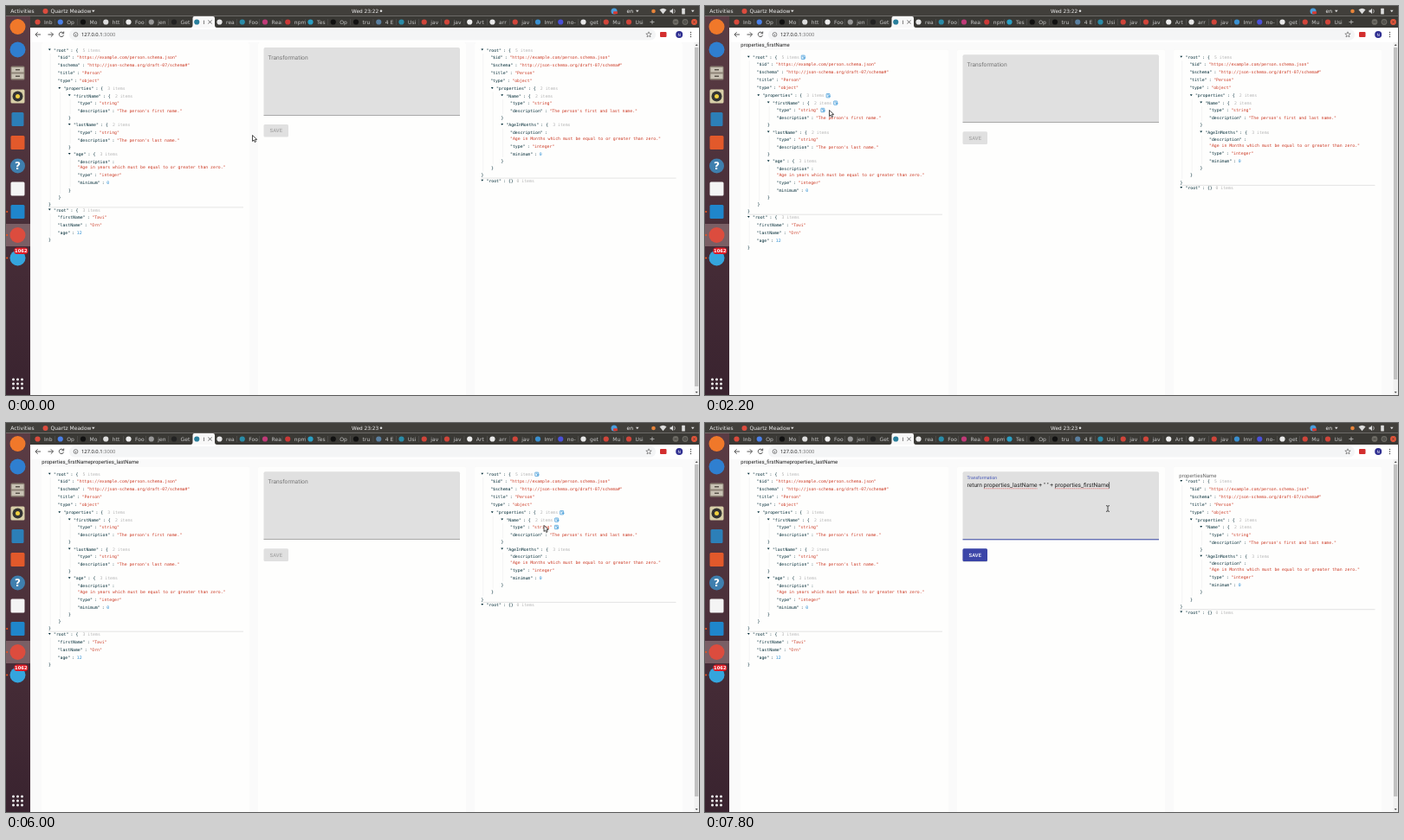
Animation, 800 px wide and 450 px high, one loop 8 s. Source, as an HTML page:

```html
<!DOCTYPE html>
<html>
<head>
<meta charset="utf-8">
<style>
  html, body { margin: 0; width: 100%; height: 100%; overflow: hidden; background: #fafafa; }
  svg { display: block; width: 800px; height: 450px; text-rendering: geometricPrecision; }
  .mono { font: 4.82px "DejaVu Sans Mono", monospace; }
  .app { font-family: Roboto, sans-serif; }
  .sys { font: 6px "DejaVu Sans", sans-serif; }
  .url { font: 5.8px "Noto Sans", sans-serif; }
</style>
</head>
<body>
<svg viewBox="0 0 800 450"><g id="page"></g><g id="frame"></g><g id="pointer"></g></svg>
<script>
const LOOP = 8000, STEP = 200, SHIFT = 8.3, CHAR = 2.902, INDENT = 11.45;
const FIRST_PICK = 2200, CLOCK_TICK = 3000, SECOND_PICK = 3800, THIRD_PICK = 6200, FOCUS = 6800;
const FORMULA = 'return properties_lastName + " " + properties_firstName';
const INK = '#002b36', BLUE = '#268bd2', RED = '#cc3a24';
const $ = id => document.getElementById(id);

const rect = (x, y, w, h, fill, extra = '') =>
  `<rect x="${x}" y="${y}" width="${w}" height="${h}" fill="${fill}" ${extra}/>`;
const dot = (x, y, r, fill, extra = '') => `<circle cx="${x}" cy="${y}" r="${r}" fill="${fill}" ${extra}/>`;
const path = (d, fill, stroke = 'none', width = 1, extra = '') =>
  `<path d="${d}" fill="${fill}" stroke="${stroke}" stroke-width="${width}" ${extra}/>`;
const text = (kind, x, y, s, fill, extra = '') =>
  `<text class="${kind}" x="${x}" y="${y}" fill="${fill}" ${extra}>${s}</text>`;
const mono = (x, y, s, fill = INK, extra = '') => text('mono', x, y + 1.7, s, fill, extra);
const app = (x, y, s, fill, size, extra = '') => text('app', x, y, s, fill, `font-size="${size}" ${extra}`);
const BOLD = 'font-weight="bold"';

// Documents shown in the side panels
const schema = properties => ({
  $id: 'https://example.com/person.schema.json',
  $schema: 'http://json-schema.org/draft-07/schema#',
  title: 'Person', type: 'object', properties
});
const nameField = which => ({ type: 'string', description: `The person's ${which} name.` });
const ageField = unit => ({
  description: `Age in ${unit} which must be equal to or greater than zero.`, type: 'integer', minimum: 0
});
const input = schema({ firstName: nameField('first'), lastName: nameField('last'), age: ageField('years') });
const output = schema({ Name: nameField('first and last'), AgeInMonths: ageField('Months') });
const sample = { firstName: 'Tavi', lastName: 'Orn', age: 12 };

// Pointer path: time, x, y
const route = [
  [0, 284.5, 149.5], [400, 284.5, 149.5], [1200, 152, 123], [1600, 152, 123], [1800, 143.5, 120.5],
  [2400, 143.5, 120.5], [3400, 170, 158], [3600, 172, 161], [3800, 172, 161], [4400, 500, 140],
  [5400, 628, 121], [5800, 628, 121], [6000, 621, 118.5], [6200, 621, 118.5], [6600, 460.5, 99],
  [7000, 465, 99], [LOOP, 465, 99]
];
function pointerAt(t) {
  const i = Math.max(1, route.findIndex(p => p[0] >= t));
  const [t0, x0, y0] = route[i - 1], [t1, x1, y1] = route[i];
  const k = (t - t0) / (t1 - t0);
  return { x: x0 + (x1 - x0) * k, y: y0 + (y1 - y0) * k };
}

const copyIcon = (x, y) =>
  rect(x - 2.2, y - 2.2, 4, 4.4, '#e4f1fa', `stroke="${BLUE}" stroke-width=".6" rx=".4"`) +
  path(`M${x - 1} ${y - 1}h1.6M${x + 2.8} ${y + .6}h-2.6m1-1l-1 1 1 1`, 'none', BLUE, .6);

// Draws one collapsible document and returns the y below it
function tree(data, x, y, mouse) {
  let svg = '';
  const over = (top, bottom) => mouse.x > x && mouse.x < x + 226 && mouse.y > top && mouse.y < bottom;

  function walk(key, val, depth) {
    const isObject = typeof val === 'object', pad = INDENT * depth, top = y, label = `"${key}"`;
    const kx = x + pad + (isObject ? 7 : .2), end = kx + label.length * CHAR;
    svg += mono(kx, y, label) + mono(end + 2.2, y, ':', INK, BOLD);
    if (!isObject) {
      const s = typeof val === 'string' ? `"${val}"` : `${val}`;
      const wraps = s.length > 50;
      if (wraps) y += 6.9;
      const vx = wraps ? kx : end + 7.7;
      svg += mono(vx, y, s, s[0] === '"' ? RED : BLUE);
      if (over(top - 4.3, y + 4.5)) svg += copyIcon(vx + s.length * CHAR + 5.2, y);
      y += 9;
      return;
    }
    const kids = Object.entries(val), n = kids.length, ix = end + (n ? 16.1 : 17.6);
    svg += path(`M${x + pad + .9} ${y - 1.5}h2.8l-1.4 2z`, INK) +
      mono(end + 8, y, n ? '{' : '{}', INK, BOLD) +
      mono(ix, y, `${n} items`, '#b4b4b4', 'font-style="italic"');
    y += 8.4;
    if (n) {
      kids.forEach(([k, v]) => walk(k, v, depth + 1));
      if (typeof kids[n - 1][1] !== 'object') y -= .9;
      svg += path(`M${x + pad + 3.2} ${top + 4}V${y - 4}`, 'none', '#ebebeb', .5) +
        mono(x + pad + 1, y, '}', INK, BOLD);
      y += 8.3;
    }
    if (over(top - 4.3, y - 4.3)) svg += copyIcon(ix + 7 * CHAR + 4.6, top);
  }
  walk('root', data, 0);
  return { svg, y };
}

function stack(first, second, x, y, mouse) {
  const a = tree(first, x, y, mouse);
  const b = tree(second, x, a.y - 1.6, mouse);
  return a.svg + path(`M${x + 1} ${a.y - 4.8}h225`, 'none', '#d8d8d8', .7) + b.svg;
}

function editor(t, dy, mouse) {
  const y = 48 + dy, focused = t >= FOCUS, ready = t >= THIRD_PICK;
  const hover = mouse.x > 297.5 && mouse.x < 524 && mouse.y > y && mouse.y < y + 78.5;
  const line = focused ? '#303f9f' : hover ? '#333' : '#8c8c8c';
  let svg = path(`M297.5 ${y + 78.5}v-76.5q0-2 2-2h222.5q2 0 2 2v76.5z`, hover && !focused ? '#cfcfcf' : '#e0e0e0') +
    rect(297.5, y + 78, 226.5, focused ? 1 : .7, line);
  if (focused) {
    const typed = FORMULA.slice(0, Math.round(FORMULA.length * Math.max(0, (t - 7000) / 800)));
    svg += app(302.5, y + 8.4, 'Transformation', '#3f51b5', 5.06) +
      app(302.5, y + 18, typed, '#222', 6.68, 'id="typed"');
    [[26, 321.8, 383.6], [FORMULA.length, 403.7, 466.4]].forEach(([count, a, b]) => {
      if (typed.length >= count)
        svg += path(`M${a} ${y + 19.5}H${b}`, 'none', '#e05050', .6, 'stroke-dasharray="1.2 .5"');
    });
    svg += rect(302.6, y + 12, .6, 7.4, '#111', 'id="caret"');
  } else svg += app(302.5, y + 13.7, 'Transformation', '#757575', 6.72);
  svg += rect(297.5, y + 89, 28.5, 14.6, ready ? '#3a45a8' : '#e0e0e0', `rx="1.5" ${ready ? 'filter="url(#soft)"' : ''}`);
  return svg + app(311.8, y + 98.4, 'SAVE', ready ? '#fff' : '#a6a6a6', 5.9, 'font-weight="500" text-anchor="middle"');
}

function page(t, mouse) {
  const dy = t >= FIRST_PICK ? SHIFT : 0, picked = t >= THIRD_PICK;
  let svg = `<defs><filter id="soft" x="-10%" y="-10%" width="120%" height="130%">
    <feDropShadow dx="0" dy=".5" stdDeviation=".6" flood-opacity=".25"/></filter></defs>` +
    rect(28, 42, 772, 408, '#fafafa');
  [41, 291, 541].forEach(x => svg += rect(x, 42 + dy, 240, 450, '#fefefd', 'rx="1.5" filter="url(#soft)"'));
  if (dy) svg += app(41.3, 47.3, 'properties_firstName' + (t >= SECOND_PICK ? 'properties_lastName' : ''), '#222', 6);
  if (picked) svg += app(547.3, 62.5, 'propertiesName', '#666', 6);
  svg += stack(input, sample, 48, 51 + dy, mouse) +
    stack(output, {}, 547.5, 51 + dy + (picked ? SHIFT : 0), mouse) + editor(t, dy, mouse);
  return svg + rect(794.5, 42, 5.5, 408, '#f1f1f1') + rect(795, 48, 4.3, dy ? 384 : 392, '#c1c1c1') +
    path('M795.7 46h3l-1.5-2zM795.7 446h3l-1.5 2z', '#555');
}

function dock() {
  const x = 13.5, square = (y, fill, w = 16) => rect(x - w / 2, y - 8, w, 16, fill, 'rx="1.5"');
  let svg = `<linearGradient id="dock" x2="0" y2="1"><stop stop-color="#5b3c44"/><stop offset="1" stop-color="#39232f"/></linearGradient>` +
    rect(0, 11.5, 28, 438.5, 'url(#dock)') + rect(0, 252, 28, 26, '#7a5f65') +
    dot(x, 24, 9, '#f0782a') + dot(x, 50.5, 9, '#2f7fd0') +
    square(77.5, '#8d8476') + rect(6.5, 71, 14, 5.5, '#c9c2b4') + rect(6.5, 78.5, 14, 5.5, '#c9c2b4') +
    rect(11, 73, 5, 1.5, '#5c564c') + rect(11, 80.5, 5, 1.5, '#5c564c') +
    square(104.5, '#d8cfa8') + dot(x, 104.5, 6, '#333') + dot(x, 104.5, 2.5, '#f0d040') +
    square(131, '#2c7fb8', 14) + square(158, '#e2592b') + dot(x, 185, 8.5, '#3f7fae') +
    text('sys', x, 189.4, '?', '#fff', 'text-anchor="middle" style="font-size:12px;font-weight:bold"') +
    square(211.5, '#f4f4f4') + square(238, '#1f86cb') + dot(x, 265, 9, '#dc4c3e') + dot(x, 291.5, 9, '#35a5dd') +
    rect(9.3, 279.5, 16, 7.5, '#e01b24', 'rx="3.5"') +
    text('sys', 17.3, 285.3, '1062', '#fff', 'text-anchor="middle" style="font-size:5.2px;font-weight:bold"');
  [238, 265, 291.5].forEach(y => svg += dot(1.2, y, 1.1, '#e95420'));
  for (let i = 0; i < 9; i++) svg += dot(8.5 + i % 3 * 5, 432 + Math.floor(i / 3) * 5, 1.5, '#eee');
  return svg;
}

function tabs() {
  const labels = 'Inb Op Mo htt Foo jen Get I rea Foo Rea npm Tes Op tru 4_E Usi jav jav Art arr jav Imr no- get Mu Usi'.split(' ');
  const tints = '#d84a3c #4a80e8 #111 #ddd #eee #999 #222 #2a7f9c #e8e8e8 #2a8ca8 #c03a78 #cb3837 #2a9fc4 #111 #111 #5a7fa0 #2a8ca8 #d0453a #d0453a #eee #e8e8e8 #d0453a #3a90d0 #4a50d8 #e8e8e8 #d0453a #d0453a'.split(' ');
  let svg = rect(28, 11.5, 772, 13.5, '#3a3935') +
    path('M213 25q2.5 0 2.5-3v-8q0-2 2-2h21.5q2 0 2 2v8q0 3 2.5 3z', '#f8f8f8');
  labels.forEach((label, i) => {
    const x = 36.5 + i * 26.25, active = i === 7;
    svg += dot(x, 18.5, 3.1, tints[i]) +
      text('sys', x + 7.6, 20.6, label.replace('_', ' '), active ? '#333' : '#c8c8c8');
    if (i > 0 && !active && i !== 8) svg += rect(x - 6.5, 15, .4, 7, '#666');
  });
  [773, 784, 794.5].forEach((x, i) => svg += dot(x, 18.5, 3.4, i < 2 ? '#6b6962' : '#e2553a'));
  return svg + path('M233.5 16.5l4 4m0-4l-4 4', 'none', '#444', .8) +
    path('M743.5 18.5h5m-2.5-2.5v5', 'none', '#ccc', .7) +
    path('M771.5 18.5h3M782.7 17.2h2.6v2.6h-2.6zM793.3 17.3l2.4 2.4m0-2.4l-2.4 2.4', 'none', '#2d2c2a', .6);
}

function toolbar() {
  return rect(28, 25, 772, 17, '#fff') + rect(73, 27, 677, 12.5, '#f4f5f6', 'rx="6"') +
    path('M40 33h-6m2.7-2.7l-2.7 2.7 2.7 2.7', 'none', '#444', .9) +
    path('M48.5 33h6m-2.7-2.7l2.7 2.7-2.7 2.7', 'none', '#444', .9) +
    path('M66.2 31.3a2.7 2.7 0 1 0 .4 2.3M66.7 29.5v2.3h-2.3', 'none', '#444', .9) +
    dot(80.5, 33, 2.4, 'none', 'stroke="#555" stroke-width=".7"') + rect(80.1, 32.6, .8, 1.8, '#555') +
    text('url', 87, 35.2, '127.0.0.1<tspan fill="#777">:3000</tspan>', '#222') +
    path('M742 29.8l.9 2.2 2.3.1-1.8 1.5.6 2.3-2-1.3-2 1.3.6-2.3-1.8-1.5 2.3-.1z', 'none', '#555', .6) +
    rect(755, 30, 7.5, 6, '#d32f2f', 'rx="1"') + dot(777.2, 33, 4, '#2f2f91') +
    text('sys', 777.2, 34.7, 'N', '#fff', 'text-anchor="middle" style="font-size:4.5px"') +
    [30.5, 33, 35.5].map(y => dot(790.5, y, .7, '#444')).join('');
}

function topBar(t) {
  const chevron = x => path(`M${x} 4.8h3.6l-1.8 2.4z`, '#ddd');
  return rect(0, 0, 800, 11.5, '#413f3b') + text('sys', 5.3, 8.1, 'Activities', '#eee') +
    dot(45.5, 6, 3, '#dc4c3e') + text('sys', 51.5, 8.1, 'Quartz Meadow', '#eee') + chevron(99) +
    text('sys', 399, 8.1, t < CLOCK_TICK ? 'Wed 23:22' : 'Wed 23:23', '#eee', 'style="font-size:5.8px"') +
    dot(433, 5.8, 1.3, '#ddd') + dot(702, 6, 3.5, '#4b9ddb') + rect(701, 6.2, 5, 3, '#d83a32', 'rx="1"') +
    text('sys', 716.5, 8, 'en', '#eee') + chevron(727) + dot(747.5, 6, 2.3, '#e8843a') +
    path('M754.5 4.2q4-3 8 0l-4 5z', '#ddd') +
    path('M766.5 4.7h1.6l2-2v6.6l-2-2h-1.6z', '#ddd') + path('M771.5 3.8q1.7 2.2 0 4.4', 'none', '#ddd', .7) +
    rect(780.2, 2.8, 3.6, 6.7, '#ddd', 'rx=".5"') + chevron(791);
}

function pointer({ x, y }, dy) {
  if (x > 297.5 && x < 524 && y > 48 + dy && y < 126.5 + dy)
    return path(`M${x - 2} ${y - 3.4}q2 0 2 1v4.8q0 1-2 1m4-6.8q-2 0-2 1m0 4.8q0 1 2 1`, 'none', '#222', .8);
  return path(`M${x} ${y}v7l1.6-1.5 1.1 2.5 1.4-.6-1.1-2.5h2.2z`, '#fff', '#222', .8, 'stroke-linejoin="round"');
}

let shown = -1;
const chrome = tabs() + toolbar() + dock();
function draw(now) {
  const t = Math.floor(now % LOOP / STEP) * STEP;
  if (t !== shown) {
    shown = t;
    const mouse = pointerAt(t);
    $('page').innerHTML = page(t, mouse);
    $('frame').innerHTML = chrome + topBar(t);
    $('pointer').innerHTML = pointer(mouse, t >= FIRST_PICK ? SHIFT : 0);
    if ($('caret')) $('caret').setAttribute('x', 302.6 + $('typed').getComputedTextLength());
  }
}
const start = performance.now();
function tick() {
  draw(performance.now() - start);
  requestAnimationFrame(tick);
}
tick();
</script>
</body>
</html>
```
